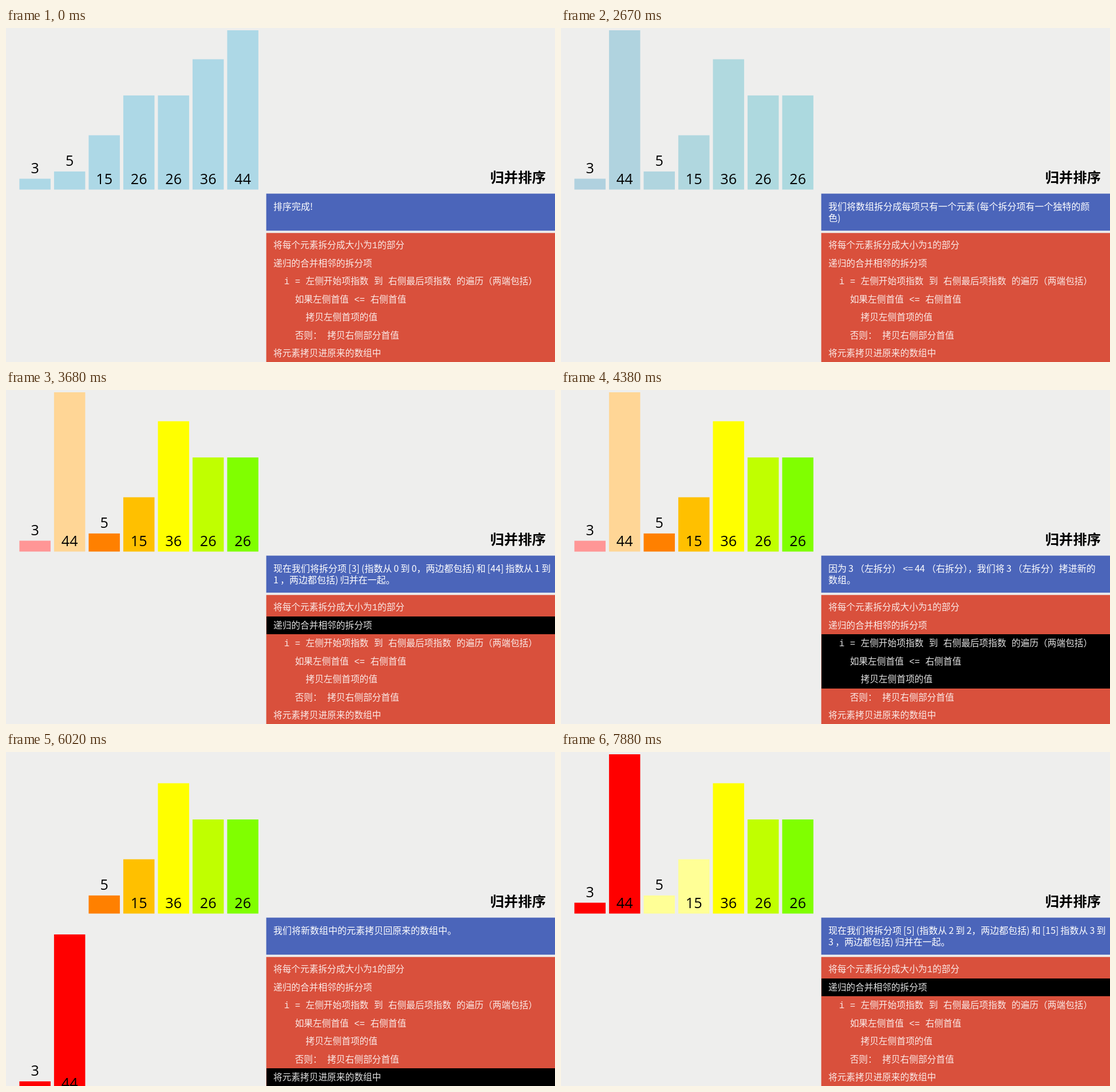
An HTML page that plays this animation: 959 by 584 pixels, repeating every 8 s.

```html
<!DOCTYPE html>
<html lang="zh-CN">
<head>
<meta charset="utf-8">
<title>归并排序</title>
<style>
  html, body { margin: 0; width: 100%; height: 100%; overflow: hidden; background: #eeeeed; }
  svg { display: block; width: 959px; height: 584px; }
  text { white-space: pre; }
  .num { font: 25px "Open Sans", "Noto Sans", sans-serif; text-anchor: middle; }
  .title { font: bold 24.3px "Noto Sans CJK SC", "Noto Sans CJK", sans-serif; }
  .note { font: 500 16px "Noto Sans CJK SC", "Noto Sans CJK", sans-serif; word-spacing: -.5px; fill: #fff; }
  .code { font: 300 15.7px "Liberation Mono", "Noto Sans CJK SC", "Noto Sans CJK", monospace; fill: #fff; fill-opacity: .88; }
  .mark { shape-rendering: crispEdges; }
</style>
</head>
<body>
<svg id="stage" viewBox="0 0 959 584"></svg>
<script>
const LOOP = 8000, EASE_MS = 250;
const PITCH = 60.5, BAR_W = 54.5, LEFT = 23.4, BASE = 282.5, UNIT = 6.33, DROP = 315;
const PANEL = { x: 454.6, width: 504.4 };
const ROW_TOP = 364.4, ROW_H = 31.45;

const values = [3, 44, 5, 15, 36, 26, 26];
const sorted = [0, 6, 1, 2, 5, 3, 4];
const code = [
  '将每个元素拆分成大小为1的部分',
  '递归的合并相邻的拆分项',
  '  i = 左侧开始项指数 到 右侧最后项指数 的遍历（两端包括）',
  '    如果左侧首值 <= 右侧首值',
  '      拷贝左侧首项的值',
  '    否则： 拷贝右侧部分首值',
  '将元素拷贝进原来的数组中'
];

const blue = [173, 216, 230], red = [255, 0, 0];
const hues = [red, [255, 64, 0], [255, 128, 0], [255, 192, 0], [255, 255, 0], [192, 255, 0], [128, 255, 0]];
const light = c => c.map(v => Math.min(255, v + 150));
const mergeNote = (a, b, i, j) => [
  `现在我们将拆分项 [${a}] (指数从 ${i} 到 ${i}，两边都包括) 和 [${b}] 指数从 ${j} 到`,
  `${j} ，两边都包括) 归并在一起。`
];
const copyBack = ['我们将新数组中的元素拷贝回原来的数组中。'];

// Each stage eases the listed bars to new values; lead is the time already eased at its first step.
const stages = [
  { at: 0, end: 0, steps: 1, lead: EASE_MS, note: ['排序完成!'], rows: [], set: {} },
  { at: 500, end: 730, steps: 4, lead: 35, note: [], rows: [],
    set: Object.fromEntries(values.map((v, i) => [i, { slot: i }])) },
  { at: 2670, end: 2900, steps: 4, lead: 50, rows: [],
    note: ['我们将数组拆分成每项只有一个元素 (每个拆分项有一个独特的颜', '色)'],
    set: Object.fromEntries(hues.map((fill, i) => [i, { fill }])) },
  { at: 3450, end: 3680, steps: 4, lead: 35, rows: [1], note: mergeNote(3, 44, 0, 1),
    set: { 0: { fill: light(hues[0]) }, 1: { fill: light(hues[1]) } } },
  { at: 4310, end: 4610, steps: 5, lead: 10, rows: [2, 3, 4],
    note: ['因为 3 （左拆分） <= 44 （右拆分），我们将 3 （左拆分）拷进新的', '数组。'],
    set: { 0: { fill: red, down: 1 } } },
  { at: 5160, end: 5470, steps: 5, lead: 10, rows: [2, 5],
    note: ['因为左拆分是空的，我们将 44 （右拆分）拷进新的数组。奇怪的'],
    set: { 1: { fill: red, down: 1 } } },
  { at: 6020, end: 6250, steps: 4, lead: 32, rows: [6], note: copyBack, set: { 0: { down: 0 } } },
  { at: 6860, end: 7100, steps: 4, lead: 32, rows: [6], note: copyBack, set: { 1: { down: 0 } } },
  { at: 7650, end: 7880, steps: 4, lead: 35, rows: [1], note: mergeNote(5, 15, 2, 3),
    set: { 2: { fill: light(hues[2]) }, 3: { fill: light(hues[3]) } } }
];

let bars = sorted.map(slot => ({ slot, down: 0, fill: blue }));
for (const s of stages) {
  s.from = bars;
  s.to = bars = bars.map((b, i) => ({ ...b, ...s.set[i] }));
}

const svg = document.getElementById('stage');
function add(tag, attrs, text = '', parent = svg) {
  const el = document.createElementNS('http://www.w3.org/2000/svg', tag);
  for (const k in attrs) el.setAttribute(k, attrs[k]);
  el.textContent = text;
  return parent.appendChild(el);
}

const groups = values.map(v => {
  const g = add('g', {}), h = v * UNIT, top = BASE - h;
  const rect = add('rect', { x: 0, y: top, width: BAR_W, height: h }, '', g);
  add('text', { class: 'num', x: BAR_W / 2, y: (v < 10 ? top : BASE) - 10 }, v, g);
  return { g, rect };
});

add('text', { class: 'title', x: 845.8, y: 269.5 }, '归并排序');
add('rect', { ...PANEL, y: 289.6, height: 64.8, fill: '#4b65ba' });
add('rect', { ...PANEL, y: 358.4, height: 225.6, fill: '#d9503c' });
const notes = [317.7, 337.7].map(y => add('text', { class: 'note', x: 467, y }));
const marks = code.map((line, i) => {
  const y = ROW_TOP + i * ROW_H;
  const mark = add('rect', { class: 'mark', ...PANEL, y, height: ROW_H });
  add('text', { class: 'code', x: 467, y: y + 21 }, line);
  return mark;
});

const ease = t => t < .5 ? 4 * t ** 3 : 1 - 4 * (1 - t) ** 3;
const mix = (a, b, p) => a + (b - a) * p;

// The motion advances in a few held steps per stage.
function progress(s, time) {
  if (time >= s.end) return 1;
  const gap = (s.end - s.at) / (s.steps - 1);
  const elapsed = Math.floor((time - s.at) / gap) * gap;
  return ease(Math.min(1, (s.lead + elapsed) / EASE_MS));
}

let shown;
function showText(s) {
  if (s === shown) return;
  shown = s;
  notes.forEach((el, i) => el.textContent = s.note[i] || '');
  marks.forEach((el, i) => el.setAttribute('visibility', s.rows.includes(i) ? 'visible' : 'hidden'));
}

function draw(time) {
  const s = stages.filter(x => x.at <= time).pop();
  const p = progress(s, time);
  showText(s);
  groups.forEach(({ g, rect }, i) => {
    const a = s.from[i], b = s.to[i];
    const x = LEFT + PITCH * mix(a.slot, b.slot, p);
    const y = DROP * mix(a.down, b.down, p);
    g.setAttribute('transform', `translate(${x} ${y})`);
    rect.setAttribute('fill', `rgb(${a.fill.map((c, k) => Math.round(mix(c, b.fill[k], p)))})`);
  });
}

const start = performance.now();
function tick() {
  draw((performance.now() - start) % LOOP);
  requestAnimationFrame(tick);
}
tick();
</script>
</body>
</html>
```
